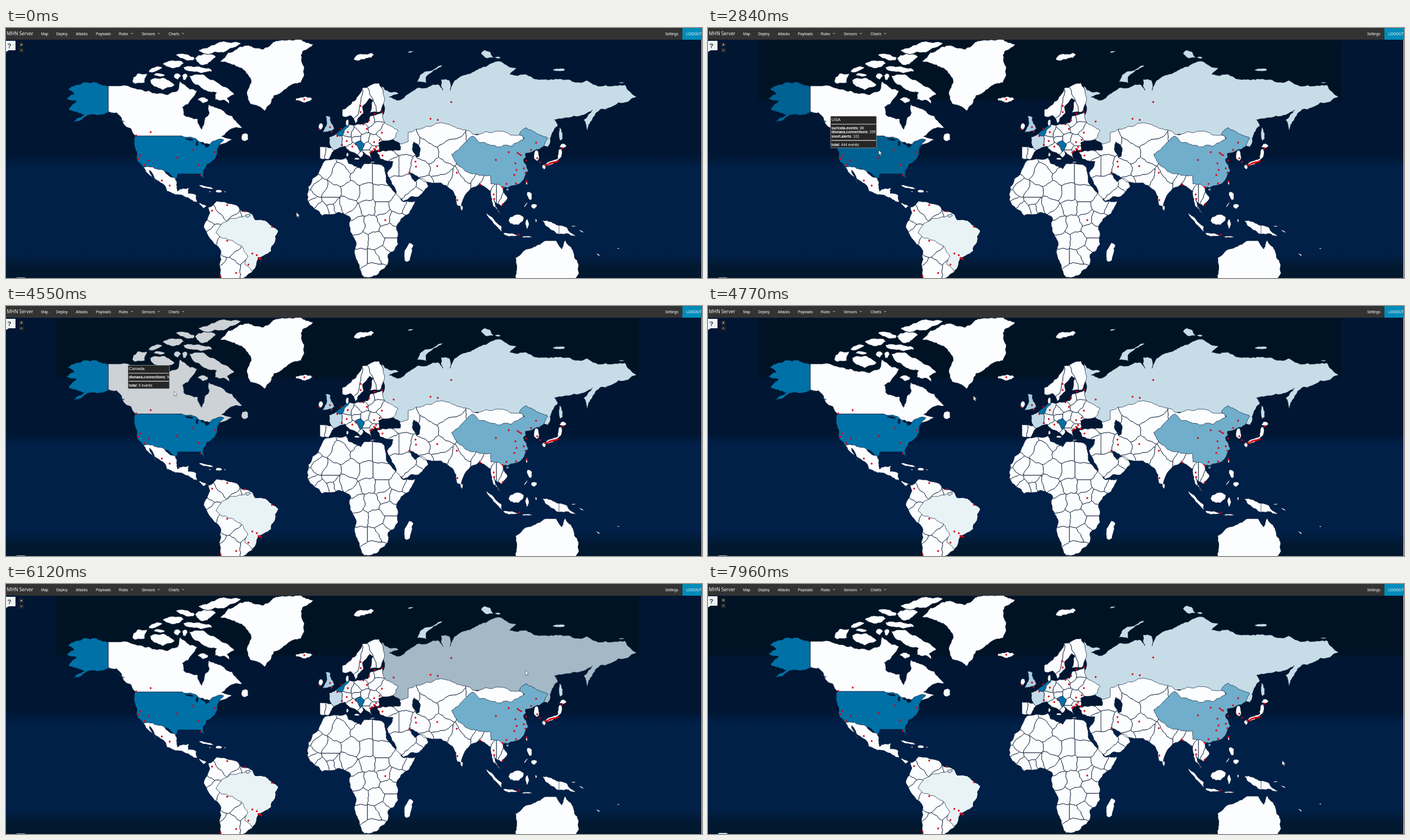
An HTML page for the animation above (7.99 s loop, 1246 px wide and 449 px high).

```html
<!DOCTYPE html>
<html lang="en">
<head>
<meta charset="utf-8">
<title>Attack map</title>
<style>
html, body { margin: 0; width: 100%; height: 100%; overflow: hidden; background: #001633; }
svg { display: block; width: 100%; height: 100%; }
text { font-family: "Liberation Sans", Arial, sans-serif; font-size: 6.5px; fill: #fff; white-space: pre; }
.brand { font-family: "Open Sans", "Noto Sans", sans-serif; font-size: 8.4px; }
.b { font-weight: bold; }
#land path { stroke: #0a1c36; stroke-width: .7; stroke-linejoin: round; }
#dots { fill: #d9000f; }
</style>
</head>
<body>
<svg viewBox="0 0 1246 449" preserveAspectRatio="none">
  <defs>
    <linearGradient id="sea" x2="0" y2="1">
      <stop offset=".51" stop-color="#001633"/><stop offset=".56" stop-color="#002048"/>
      <stop offset=".9" stop-color="#002048"/><stop offset=".96" stop-color="#02182f"/>
    </linearGradient>
    <linearGradient id="night" x2="0" y2="1">
      <stop offset=".92" stop-color="#001324"/><stop offset="1" stop-color="#001633"/>
    </linearGradient>
  </defs>
  <rect width="1246" height="449" fill="url(#sea)"/>
  <rect id="top" y="22" height="112" fill="url(#night)"/>
  <rect x="1245" y="21" width="1" height="428" fill="#dfe6ea"/>
  <g id="page">
    <g id="land"></g>
    <g id="dots"></g>
    <path d="M0 23H17V40H5L0 43Z" fill="#edf4f7"/>
    <text class="b" x="2.5" y="36" style="font-size:11.5px;fill:#333">?</text>
    <rect x="23.5" y="26" width="8" height="8" rx="1" fill="#252525"/>
    <rect x="23.5" y="36" width="8" height="8" rx="1" fill="#252525"/>
    <path d="M25.7 30h3.6m-1.8-1.8v3.6M25.7 40h3.6" stroke="#ddd" stroke-width=".8"/>
    <rect x="18" y="448.3" width="17" height="6" rx="2" fill="#edf4f7"/>
  </g>
  <rect width="1246" height="21" fill="#333"/>
  <rect x="1211" width="35" height="21" fill="#008cba"/>
  <text class="brand" x="1.5" y="13.2">MHN Server</text>
  <g id="nav"></g>
  <g id="tip"></g>
  <path id="cursor" d="M0 0V8.4L1.9 6.7 3.3 9.8 4.6 9.2 3.2 6.2H5.8Z" fill="#fff" stroke="#222" stroke-width=".5"/>
</svg>
<script>
const $ = id => document.getElementById(id);
const LOOP = 7990, WHITE = '#fcfdff', BLUE = '#0071a7', PALE = '#c3dbe9', SEA = '#001c3d';

function add(parent, tag, attrs, text) {
  const el = document.createElementNS('http://www.w3.org/2000/svg', tag);
  for (const k in attrs) el.setAttribute(k, attrs[k]);
  if (text) el.textContent = text;
  parent.append(el);
  return el;
}

// Seeded by place, so neighbours share the same ragged edge
function noise(x, y) {
  const v = Math.sin(Math.round(x) * 12.9898 + Math.round(y) * 78.233) * 43758.5453;
  return v - Math.floor(v) - .5;
}
function edge([ax, ay], [bx, by], out) {
  const dx = bx - ax, dy = by - ay, len = Math.hypot(dx, dy);
  if (len > 5 && dx && dy) {
    const x = (ax + bx) / 2, y = (ay + by) / 2;
    const k = noise(x, y) * .26 * (dx < 0 ? -1 : 1);
    const mid = [x - dy * k, y + dx * k];
    edge([ax, ay], mid, out);
    edge(mid, [bx, by], out);
  } else out.push(bx.toFixed(1) + ' ' + by.toFixed(1));
}
function ragged(pts) {
  const out = [];
  pts.forEach((p, i) => edge(p, pts[(i + 1) % pts.length], out));
  return 'M' + out.join('L') + 'Z';
}
const parse = s => s.split(' ').map(p => p.split(',').map(Number));
const path = (d, fill, clip) =>
  add($('land'), 'path', clip ? { d, fill, 'clip-path': `url(#${clip})` } : { d, fill });
const land = (fill, s, clip) => path(ragged(parse(s)), fill, clip);

// Islands: centre, radii, tilt in degrees
function isles(fill, s) {
  const d = parse(s).map(([x, y, rx, ry, tilt = 0]) => {
    const c = Math.cos(tilt * Math.PI / 180), q = Math.sin(tilt * Math.PI / 180), pts = [];
    for (let i = 0; i < 9; i++) {
      const a = i / 9 * 2 * Math.PI, r = 1 + noise(x + i * 7, y) * .5;
      const u = Math.cos(a) * rx * r, v = Math.sin(a) * ry * r;
      pts.push([x + u * c - v * q, y + u * q + v * c]);
    }
    return ragged(pts);
  });
  return path(d.join(''), fill);
}

// Countries: one cell around each site, cut to the coast
function nearer(poly, s, o) {
  const gap = p => (p[0] - s[0]) ** 2 + (p[1] - s[1]) ** 2 - (p[0] - o[0]) ** 2 - (p[1] - o[1]) ** 2;
  return poly.flatMap((p, i) => {
    const q = poly[(i + 1) % poly.length], a = gap(p), b = gap(q), f = a / (a - b);
    const keep = a <= 0 ? [p] : [];
    if (a <= 0 !== b <= 0) keep.push([p[0] + (q[0] - p[0]) * f, p[1] + (q[1] - p[1]) * f]);
    return keep;
  });
}
function coast(id, el) {
  add(add(document.querySelector('defs'), 'clipPath', { id }), 'path', { d: el.getAttribute('d') });
}
function countries(id, s, fills = {}) {
  const sites = parse(s), xs = sites.map(p => p[0]), ys = sites.map(p => p[1]);
  const l = Math.min(...xs) - 60, r = Math.max(...xs) + 60, t = Math.min(...ys) - 60, b = Math.max(...ys) + 60;
  return sites.map((p, i) => {
    const poly = sites.reduce((c, o) => o === p ? c : nearer(c, p, o), [[l, t], [r, t], [r, b], [l, b]]);
    return path(ragged(poly), fills[i] || 'none', id);
  });
}

// North America
const canada = land(WHITE, '183,104 205,104 240,110 270,118 307,113 311,96 329,110 342,113 331,129 316,142 318,155 343,163 350,182 356,162 364,152 363,137 385,146 395,155 405,158 423,179 394,188 386,195 406,200 392,207 345,208 315,194 232,194 210,172 198,152 183,150');
const baffin = land(WHITE, '328,86 352,83 382,100 409,119 396,126 400,136 374,128 377,116 338,101');
const arctic = isles(WHITE, '380,36,36,8,-12 355,55,17,9,-10 324,52,18,5,15 298,65,18,6,-4 268,74,12,4,-15 240,91,13,9,-35 277,99,23,10,8 274,84,10,3 345,75,24,5,6 306,86,7,6 320,87,5,6 353,129,9,5,15 427,196,7,6');
land(WHITE, '383,60 418,34 500,22 550,29 531,42 534,70 528,98 480,121 463,149 437,136 431,116 439,98 422,72 395,62');
const alaska = land(BLUE, '183,105 183,150 212,168 186,152 158,155 118,171 140,156 112,146 126,131 108,126 122,119 111,110 140,97');
const usa = land(BLUE, '231,194 315,194 345,204 357,213 380,200 390,201 380,214 370,238 353,257 357,273 348,262 308,262 304,272 283,257 258,254 236,240 230,212');
isles(SEA, '329,200,7,1.5,10 342,208,2,4 352,207,4,2,30 361,212,4,1.5,-20');
land(WHITE, '246,250 278,254 303,270 307,293 328,287 326,297 341,301 342,314 364,319 354,324 330,308 288,293 281,280 257,255 271,281 249,254');
isles(WHITE, '359,286,15,2,15 381,293,6,2.5 365,294,2,1 392,294,2,1');

// South America
coast('south', land(WHITE, '362,322 377,311 408,317 440,334 446,345 487,364 474,401 451,415 443,434 421,455 384,455 385,402 363,375 354,358 365,332'));
countries('south', '372,337 395,322 416,333 426,335 358,352 369,368 400,393 418,408 402,430 380,425 437,432');
land('#e9f3f6', '376,368 386,351 402,342 412,342 437,333 460,340 500,360 480,410 450,425 440,437 428,425 433,411 424,394 400,381 386,377', 'south');
isles(PALE, '433,337,4,3');

// Africa
coast('africa', land(WHITE, '571,238 609,233 613,243 635,253 640,244 676,249 690,288 711,312 733,311 722,333 699,358 702,388 684,407 685,416 664,444 641,448 625,408 627,386 616,364 617,342 594,331 566,337 540,310 541,285 560,259'));
countries('africa', '572,247 546,280 556,290 598,262 614,243 636,264 676,264 580,298 618,295 642,300 672,300 702,318 722,322 611,318 545,301 552,314 566,325 580,310 582,324 592,322 623,332 648,322 672,324 696,343 680,340 652,352 628,350 634,384 688,362 662,385 688,392 672,404 656,412 638,412 655,435');
isles(WHITE, '721,401,7,19,15');

// Russia and the far north
const russia = land('#c6dde8', '673,104 703,118 686,124 700,130 720,118 740,107 773,101 782,112 779,92 794,94 795,112 803,94 850,72 886,60 914,72 902,83 960,92 1040,94 1108,102 1129,124 1064,146 1040,185 1034,165 1050,147 982,165 988,175 970,214 920,195 760,190 728,214 690,200 672,165');
land('#c6dde8', '735,97 750,78 782,67 752,88 753,99');
isles('#c6dde8', '861,48,11,6,25 880,53,5,2 990,75,11,3 1102,98,5,1 724,43,5,1.5,-10 993,190,3,13,-5');
isles(WHITE, '638,52,18,6,-10 533,128,13,5 563,177,4,6');

// Europe
coast('scandia', land(WHITE, '602,158 602,147 620,132 637,108 668,99 676,135 669,151 651,152 657,130 651,126 638,141 640,153 626,173 617,157 609,160'));
countries('scandia', '610,138 635,142 664,134');
isles(WHITE, '611,170,3,6 628,235,5,2 611,227,2,4 656,241,4,1');
coast('europe', land(WHITE, '562,213 583,215 579,196 600,184 611,175 648,170 652,158 674,152 680,172 702,184 698,195 667,206 668,219 653,223 656,237 646,228 627,207 640,226 634,233 607,212 590,218 577,236 562,234'));
const europe = countries('europe', '556,225 578,226 594,204 601,181 613,187 610,202 622,215 629,200 627,191 637,181 641,200 633,208 648,213 657,204 657,219 648,225 660,177 677,190 659,161 652,168', { 2: PALE, 3: BLUE, 4: '#e8f0f5', 11: BLUE });
land('#a9cde0', '572,158 581,160 588,181 567,188 573,176');

// Asia and Oceania
coast('asia', land(WHITE, '664,223 706,219 705,208 720,204 720,188 770,171 830,185 836,191 880,185 925,191 928,203 930,230 900,284 890,288 898,306 887,320 873,308 877,320 886,336 873,321 868,293 849,280 820,304 815,322 808,319 797,290 778,278 748,276 722,258 732,276 745,270 756,284 740,302 711,311 682,260 693,240 670,235'));
countries('asia', '685,228 712,214 697,245 710,245 718,283 738,300 750,285 740,252 757,226 775,195 774,250 782,272 790,222 815,275 830,262 848,272 862,285 872,294 884,294 895,300 870,200');
isles(SEA, '734,219,7,15,-20');
land('#70aecb', '798,227 836,194 848,206 880,214 905,212 928,198 919,191 932,179 950,190 970,198 962,213 930,225 931,232 926,237 935,256 925,274 898,287 868,280 867,265 840,262 806,242');
isles('#70aecb', '898,290,3,2');
isles(WHITE, '950,229,5,11,-15 997,212,6,4 963,249,3,4 816,323,2.5,5 932,278,1.5,4 937,300,4,8,-20 945,320,5,4 930,318,1,6,35');
land(WHITE, '994,217 995,228 978,245 963,247 988,234 990,218');
land(WHITE, '859,331 887,356 888,367 872,350');
isles(WHITE, '903,371,14,2.5,8 912,345,13,9,-20 933,352,3,9 933,375,11,1.5 949,346,1.5,3 1016,356,4,1 1030,365,5,1,30 1060,407,4,1,40 1096,396,2,1');
land(WHITE, '960,346 976,348 1004,358 1020,374 985,369 965,354');
add($('land'), 'path', { d: 'M990 352v19' });
land(WHITE, '911,455 912,413 945,393 966,382 985,382 995,397 1000,377 1025,424 1019,455');

// Attack origins
const dot = (cx, cy) => add($('dots'), 'circle', { cx, cy, r: 1.65 });
const dots = s => parse(s).forEach(p => dot(...p));
dots('259,187 233,193 335,219 374,223 306,233 344,246 349,265 240,229 237,235 256,238 248,246 279,274 293,283 396,318 369,328 428,329 476,357 396,382 441,405 449,408 434,425 412,440 384,446');
dots('534,128 635,140 635,151 660,154 673,151 650,166 694,168 561,182 580,178 583,186 593,194 600,181 612,187 640,173 646,181 673,188 669,201 610,203 601,210 620,213 626,209 659,205 674,229 679,345');
dots('797,133 760,163 773,165 733,240 734,249 722,260 772,248 807,260 808,309 849,281 877,237 900,223 912,243 931,238 914,255 927,252 930,260 910,264 913,279 896,280 889,286 932,276 873,299 874,307 889,317 918,371 949,206 940,219 951,234 956,241 996,216');
// Dense clusters: start, step, count
function cluster(x, y, dx, dy, n) {
  for (let i = 0; i < n; i++) dot(x + dx * i, y + dy * i + noise(x + i * 5, y) * 2);
}
cluster(966, 246, 2.2, -.7, 11);
cluster(452, 413, 1.6, .8, 4);
cluster(916, 225, 3, 2, 3);
cluster(652, 223, 3.5, -3, 4);
cluster(661, 218, 6, 2, 2);

[['Map', 63], ['Deploy', 90], ['Attacks', 125], ['Payloads', 161], ['Rules', 202, 225.5], ['Sensors', 243, 273.5], ['Charts', 291, 317], ['Settings', 1180], ['LOGOUT', 1218]].forEach(([label, x, arrow]) => {
  add($('nav'), 'text', { x, y: 12.6 }, label);
  if (arrow) add($('nav'), 'path', { d: `M${arrow - 2.5} 9h5l-2.5 2.6z`, fill: '#888' });
});

// Hover popups: offset from the pointer, width, rows
const places = {
  USA: { els: [usa, alaska], hover: '#006193', dx: -87, dy: -61, w: 83, rows: ['suricata.events: 88', 'dionaea.connections: 255', 'snort.alerts: 101'], total: 444 },
  Canada: { els: [canada, baffin, arctic], hover: '#ccd2d6', dx: -83, dy: -47, w: 75, rows: ['dionaea.connections: 9'], total: 9 },
  Germany: { els: [europe[4]], hover: '#c2ced6', dx: -73, dy: -46, w: 80, rows: ['dionaea.connections: 25', 'snort.alerts: 6', 'suricata.events: 4'], total: 35 },
  Russia: { els: [russia], hover: '#a3b9c5' }
};
function popup(name, { w, rows, total }) {
  const g = add($('tip'), 'g', { display: 'none' });
  const n = rows.length * 7.4;
  add(g, 'rect', { x: .5, y: .5, width: w - 1, height: 34.5 + n, rx: 1.5, fill: '#262626', stroke: '#999', 'stroke-width': .8 });
  add(g, 'text', { x: 2, y: 8.8, style: 'font-size:8px' }, name);
  add(g, 'path', { d: `M2 14.7H${w - 1.5}M2 ${21.7 + n}H${w - 1.5}`, stroke: '#ddd', 'stroke-width': 1.1 });
  [...rows, `total: ${total} events`].forEach((row, i) => {
    const [key, value] = row.split(':');
    const t = add(g, 'text', { x: 2, y: i < rows.length ? 24 + i * 7.4 : 31.8 + n });
    add(t, 'tspan', { class: 'b' }, key);
    add(t, 'tspan', {}, ':' + value);
  });
  return g;
}
for (const name in places) {
  const p = places[name];
  p.fill = p.els[0].getAttribute('fill');
  if (p.rows) p.tip = popup(name, p);
}

const hovers = [
  [2400, 2965, 'USA'], [2965, 3202, 'Canada'], [3202, 3801, 'USA'], [3801, 4714, 'Canada'],
  [4920, 5280, 'Germany'], [6050, 6200, 'Russia'], [6250, 6330, 'Canada']
];
const track = [
  [0, 520, 331], [309, 520, 331], [310, 520, 330], [2199, 520, 330], [2200, 511, 322], [2460, 340, 240], [2740, 340, 240],
  [3270, 160, 132], [3760, 160, 132], [4010, 300, 153], [4550, 300, 153], [4950, 617, 168], [5190, 617, 168],
  [5240, 615, 165], [5265, 615, 165], [5500, 480, 240], [5700, 620, 425], [5960, 1095, 350], [6150, 900, 120],
  [6280, 330, 150], [6440, 466, 331], [6590, 790, 410], [6950, 790, 410], [7330, 980, 312], [7630, 980, 312],
  [7960, 1028, 317], [LOOP, 1028, 317]
];
function pointer(t) {
  const i = track.findIndex(k => k[0] > t);
  const [a, ax, ay] = track[i - 1], [b, bx, by] = track[i];
  const f = (t - a) / (b - a);
  return [ax + (bx - ax) * f, ay + (by - ay) * f];
}

function draw(now) {
  const t = now % LOOP;
  const [x, y] = pointer(t);
  const over = (hovers.find(h => t >= h[0] && t < h[1]) || [])[2];
  for (const name in places) {
    const p = places[name], on = name === over;
    p.els.forEach(el => el.setAttribute('fill', on ? p.hover : p.fill));
    if (!p.tip) continue;
    p.tip.setAttribute('display', on ? 'inline' : 'none');
    p.tip.setAttribute('transform', `translate(${Math.round(x + p.dx)} ${Math.round(y + p.dy)})`);
  }
  $('cursor').setAttribute('transform', `translate(${x} ${y})`);
  const wide = t >= 7930;
  $('top').setAttribute('x', wide ? 0 : 90);
  $('top').setAttribute('width', t < 2740 ? 0 : wide ? 1245 : 1043);
  $('page').setAttribute('transform', `translate(0 ${t >= 7950 ? -1 : 0})`);
}
const start = performance.now();
function tick() {
  draw(performance.now() - start);
  requestAnimationFrame(tick);
}
tick();
</script>
</body>
</html>
```
